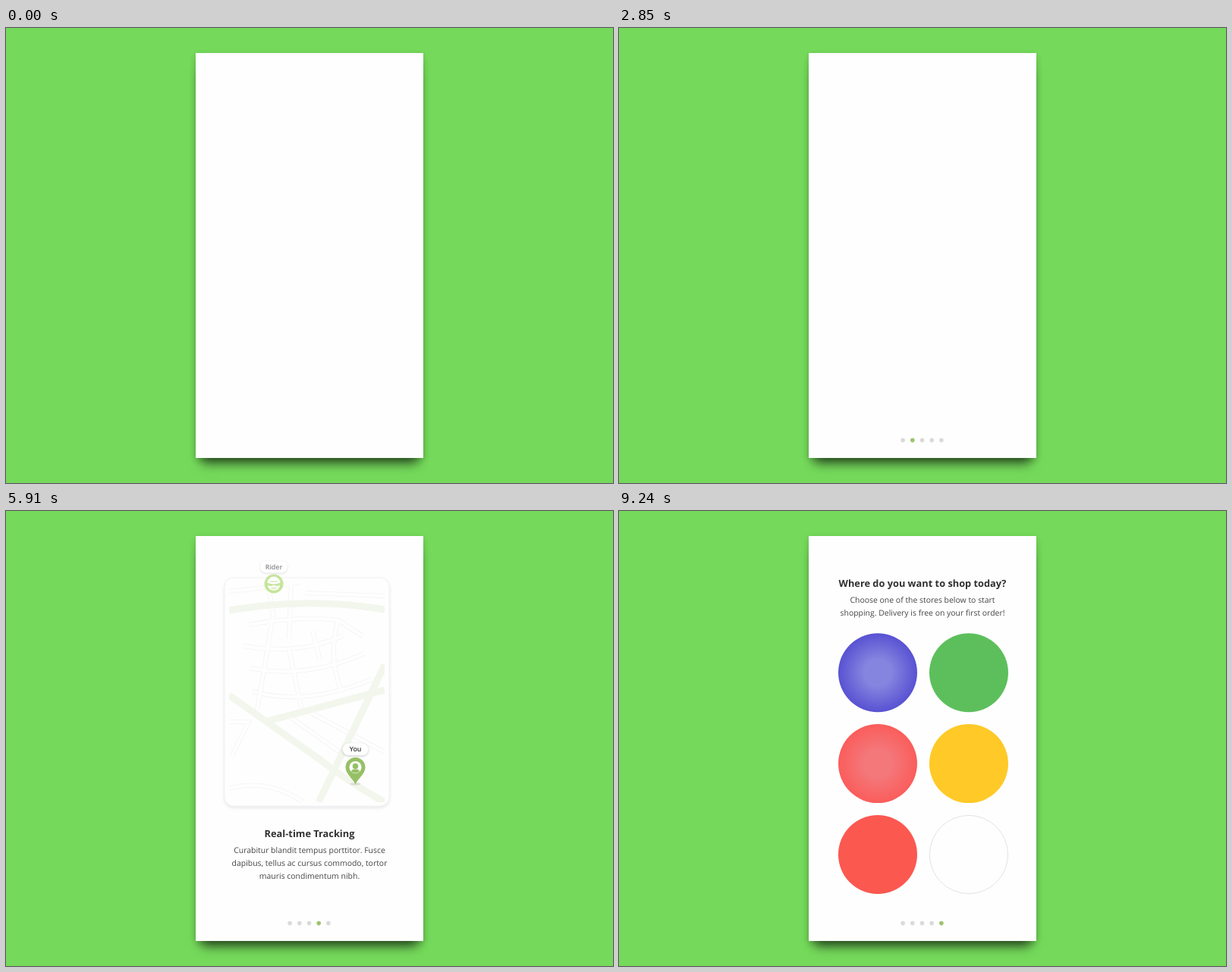
An HTML page that plays this animation: 800x600 px, repeating every 9.27 s.

```html
<!DOCTYPE html>
<html lang="en">
<head>
<meta charset="utf-8">
<title>Onboarding</title>
<style>
html, body { margin: 0; width: 100%; height: 100%; overflow: hidden; background: #75da5b; }
.card {
  position: absolute; left: 250px; top: 33px; width: 300px; height: 534px; background: #fefefe;
  box-shadow: 0 15px 14px -8px rgba(0,0,0,.62), 0 3px 9px rgba(0,0,0,.2);
}
svg { position: absolute; left: 0; top: 0; }
text { font-family: "Open Sans", sans-serif; text-anchor: middle; text-rendering: geometricPrecision; }
.title { font-size: 12.8px; font-weight: 700; fill: #303030; }
.body { font-size: 10.45px; fill: #454545; }
.label { font-size: 8.8px; font-weight: 600; fill: #333; }
.hour { font-size: 12.8px; font-weight: 600; fill: #a2a2a2; }
.brand { font: 700 12.2px Lato, sans-serif; letter-spacing: 2.3px; fill: #333; }
.pill { fill: #fff; filter: drop-shadow(0 1px 1.5px rgba(0,0,0,.22)); }
.panel { fill: #fefefe; stroke: #f3f3f3; filter: drop-shadow(0 2px 2px rgba(80,80,110,.13)); }
.hand { stroke: #96c065; stroke-width: 4.6; stroke-linecap: round; }
</style>
</head>
<body>
<div class="card"></div>
<svg id="stage" width="800" height="600" viewBox="0 0 800 600"></svg>
<script>
const LOOP = 9270, GREEN = '#96c065';
const stage = document.getElementById('stage');

const clamp = x => Math.max(0, Math.min(1, x));
const span = (t, a, b) => clamp((t - a) / (b - a));
const easeOut = p => 1 - (1 - p) ** 3;
const easeInOut = p => p * p * (3 - 2 * p);
const backOut = p => 1 + 2.2 * (p - 1) ** 3 + 1.2 * (p - 1) ** 2;

// Markup helpers
const circle = (x, y, r, fill, more = '') => `<circle cx="${x}" cy="${y}" r="${r}" fill="${fill}" ${more}/>`;
const at = (x, y, inner) => `<g transform="translate(${x} ${y})">${inner}</g>`;
const text = (cls, x, y, s) => `<text class="${cls}" x="${x}" y="${y}">${s}</text>`;
const pill = (x, y, w, s) =>
  `<rect class="pill" x="${x - w / 2}" y="${y - 8}" width="${w}" height="16" rx="8"/>` + text('label', x, y + 3.1, s);
const enter = (kind, start, end, x, y, inner) =>
  `<g class="enter" data-v="${kind},${start},${end},${x},${y}">${inner}</g>`;
const fade = (start, end, inner) => enter('fade', start, end, 0, 0, inner);
const pop = (start, x, y, inner, length = 400) => enter('pop', start, start + length, x, y, inner);
const screen = (start, end, inner) => `<g class="screen" data-v="${start},${end}">${inner}</g>`;
const copy = (y, title, lines) =>
  text('title', 400, y, title) + lines.map((s, i) => text('body', 400, y + 21.2 + i * 16.7, s)).join('');

const pin = `<ellipse cy="22" rx="7" ry="1.6" fill="#000" opacity=".1"/>
  <path d="M0 22.5C-3 15-13 9-13 0A13 13 0 0 1 13 0C13 9 3 15 0 22.5Z" fill="${GREEN}"/>
  ${circle(0, 0, 8, '#fff')}${circle(0, -1.5, 3.8, GREEN)}
  <path d="M-5.5 5.8Q-5 2.8-1.8 2.5H1.8Q5 2.8 5.5 5.8Q0 9 -5.5 5.8Z" fill="${GREEN}"/>`;

const cart = `<path d="M-8.5-6.5H-5.5L-3 3.7H6" fill="none" stroke="#fff" stroke-width="1.4"/>
  <path d="M-5.2-5H8.5L6.3 2H-3.4Z" fill="#fff"/>
  <path d="M-4.5-1.6H8M-1-5L0 2M2.2-5V2M5.5-5L4.3 2" stroke="#fca238" stroke-width=".9"/>
  ${circle(-2, 6.2, 1.7, '#fff')}${circle(5, 6.2, 1.7, '#fff')}`;
const dog = `<path d="M-8.5-6.5Q-8-2-5-2H1.5L2-6L4-7.5L5.5-6L8.5-5L8-2.5L5.3-2V7H3L2.5 3H-3L-4 7H-6.5V1Q-9.5-1-8.5-6.5Z" fill="#fff"/>`;
const croissant = `<path d="M-9 5.5Q-10-2-5.2-2.8Q0-8.5 5.2-2.8Q10-2 9 5.5Q6 5.5 4.6 3.4Q0 1.6-4.6 3.4Q-6 5.5-9 5.5Z" fill="#fff"/>
  <path d="M-5.2-2.8L-4.2 3.4M-2-5L-1.4 2.6M2-5L1.4 2.6M5.2-2.8L4.2 3.4" stroke="#55bdfa" stroke-width=".9"/>`;
const rider = circle(0, 0, 12.5, '#9fd455') +
  `<path d="M-8.5-1A8.5 8.5 0 0 1 8.5-1L0 .8Z" fill="#fff"/>
  <path d="M-8.3 1.5Q-5 4-1 2H1Q5 4 8.3 1.5Q7 8.5 0 8.8Q-7 8.5-8.3 1.5Z" fill="#fff"/>
  <path d="M-3.5 5Q0 7.5 3.5 5M-5-3H5" fill="none" stroke="#9fd455" stroke-width="1.2"/>`;

const streets = `M294 106Q345 101 388 94M345 94L352 136Q342 200 331 262M376 94L373 168
  M321 150Q385 138 438 144L470 165M313 178Q385 191 445 164M322 207Q395 222 472 188
  M325 238Q395 258 482 222M373 182L390 264M404 158L414 197M438 144Q424 190 442 238
  M400 265L499 318M375 272L440 318M294 278H320L298 322M294 366Q345 352 392 384M395 108L499 112`;
const roads = 'M294 131Q400 113 499 130M294 243L410 325Q452 358 499 384M345 277L499 236M499 203L412 384';
const map = `<g fill="none">
  <path d="${streets}" stroke="#f3f3f3" stroke-width="6"/>
  <path d="${streets}" stroke="#fefefe" stroke-width="4.4"/>
  <path d="${roads}" stroke="#f2f6ec" stroke-width="9"/></g>`;

const store = (start, x, y, w, name, color, icon) =>
  pop(start, x, y, circle(x, y, 16.2, color) + at(x, y, icon)) +
  pop(start + 120, x, y - 18, pill(x, y - 26.5, w, name), 300);

const welcome = screen(2450, 2780,
  fade(60, 400, circle(399, 112, 12.5, GREEN) + text('brand', 400, 141, 'FERNCRATE')) +
  pop(150, 399.5, 281, circle(399.5, 281, 109, '#fefefe', 'class="panel"') +
    `<g clip-path="url(#round)"><g transform="translate(0 78)">${map}</g></g>`, 500) +
  pop(500, 399, 243, at(399, 221, pin)) +
  pop(620, 399, 205, pill(399, 197, 33, 'You'), 300) +
  store(620, 325.5, 295, 48, 'Grocery', '#fca238', cart) +
  store(740, 473, 295, 48, 'Pet Store', '#e9cc37', dog) +
  store(860, 399.5, 355, 46, 'Bakery', '#55bdfa', croissant) +
  fade(250, 650, copy(431.3, 'From the Store to Your Door', [
    'Shop from your favorite neighborhood stores,',
    'and have your items delivered to you all',
    'within 90 minutes.'])));

let hours = '';
for (let h = 1; h <= 12; h++) {
  const a = h * Math.PI / 6;
  hours += text('hour', 395.5 + 82 * Math.sin(a), 253.2 - 82 * Math.cos(a), h);
}
const clock = screen(4880, 5130,
  pop(3120, 395.5, 249, circle(395.5, 249, 108.5, '#fefefe', 'class="panel"') + hours +
    `<path id="hourHand" class="hand" d="M395.5 249V191"/>
    <path id="minuteHand" class="hand" d="M395.5 249V178.5"/>` + circle(395.5, 249, 8.2, GREEN), 560) +
  fade(3200, 3600, copy(430, 'On-Demand Delivery', [
    'Cras mattis consectetur purus sit amet',
    'fermentum. Nullam quis risus eget urna',
    'mollis ornare vel eu leo.'])));

const tracking = screen(7500, 7770,
  fade(5130, 5450, `<rect class="panel" x="288" y="88" width="217" height="301" rx="12"/>
    <g clip-path="url(#inset)">${map}</g>`) +
  `<path id="route" d="M353 96Q349 190 333 268L410 325L441 350" fill="none"/>` +
  pop(5400, 460.5, 361, at(460.5, 338, pin)) +
  pop(5500, 460.5, 322, pill(460.5, 314.3, 34, 'You'), 300) +
  fade(5840, 6120, `<g id="rider">${rider}${pill(0, -22.5, 36, 'Rider')}</g>`) +
  fade(5200, 5550, copy(430, 'Real-time Tracking', [
    'Curabitur blandit tempus porttitor. Fusce',
    'dapibus, tellus ac cursus commodo, tortor',
    'mauris condimentum nibh.'])));

const shops = ['url(#blue)', '#5dbf5c', 'url(#coral)', '#ffc928', '#fb5850', '#fefefe'].map((fill, i) => {
  const x = 341 + i % 2 * 120, y = 213.2 + (i >> 1) * 119.9;
  return pop(8260 + i * 90, x, y, circle(x, y, i == 5 ? 51.6 : 52, fill, i == 5 ? 'stroke="#e2e2e2"' : ''));
}).join('');
const choose = screen(LOOP, LOOP + 1,
  fade(7820, 8120, copy(99.6, 'Where do you want to shop today?', [
    'Choose one of the stores below to start',
    'shopping. Delivery is free on your first order!'])) + shops);

let dots = '';
for (let i = 0; i < 5; i++) dots += circle(374.1 + i * 12.7, 543.6, 2.8, '#dadada', 'class="dot"');

const glow = (id, inner, outer) => `<radialGradient id="${id}">
  <stop offset=".35" stop-color="${inner}"/><stop offset="1" stop-color="${outer}"/></radialGradient>`;

stage.innerHTML = `<defs>
  <clipPath id="round">${circle(399.5, 281, 105)}</clipPath>
  <clipPath id="inset"><rect x="294" y="94" width="205" height="290"/></clipPath>
  ${glow('blue', '#8584df', '#5852d2')}${glow('coral', '#f4777a', '#fa5d5b')}</defs>`
  + welcome + clock + tracking + choose + fade(60, 300, dots);

const all = cls => [...stage.querySelectorAll('.' + cls)];
const values = el => ({ el, v: el.dataset.v.split(',') });
const entries = all('enter').map(values), screens = all('screen').map(values), dotEls = all('dot');
const part = id => document.getElementById(id);
const route = part('route'), routeLength = route.getTotalLength();
const pageStarts = [0, 2680, 3080, 5130, 7770];

function draw(t) {
  for (const { el, v } of entries) {
    const [kind, start, end, x, y] = v;
    const p = span(t, +start, +end);
    el.setAttribute('opacity', kind == 'pop' ? clamp(p * 2.5) : easeOut(p));
    if (kind == 'pop')
      el.setAttribute('transform', `translate(${x} ${y}) scale(${Math.max(0, backOut(p))}) translate(${-x} ${-y})`);
  }
  for (const { el, v } of screens) el.setAttribute('opacity', 1 - easeInOut(span(t, +v[0], +v[1])));

  const page = pageStarts.filter(s => t >= s).length - 1;
  dotEls.forEach((dot, i) => dot.setAttribute('fill', i == page ? '#9cc46d' : '#dadada'));

  const turn = easeInOut(span(t, 3880, 4750));
  part('hourHand').setAttribute('transform', `rotate(${90 + 60 * turn} 395.5 249)`);
  part('minuteHand').setAttribute('transform', `rotate(${720 * turn} 395.5 249)`);

  const spot = route.getPointAtLength(routeLength * easeInOut(span(t, 6150, 7350)));
  part('rider').setAttribute('transform', `translate(${spot.x} ${spot.y})`);
}

const began = performance.now();
function tick() {
  draw((performance.now() - began) % LOOP);
  requestAnimationFrame(tick);
}
tick();
</script>
</body>
</html>
```
